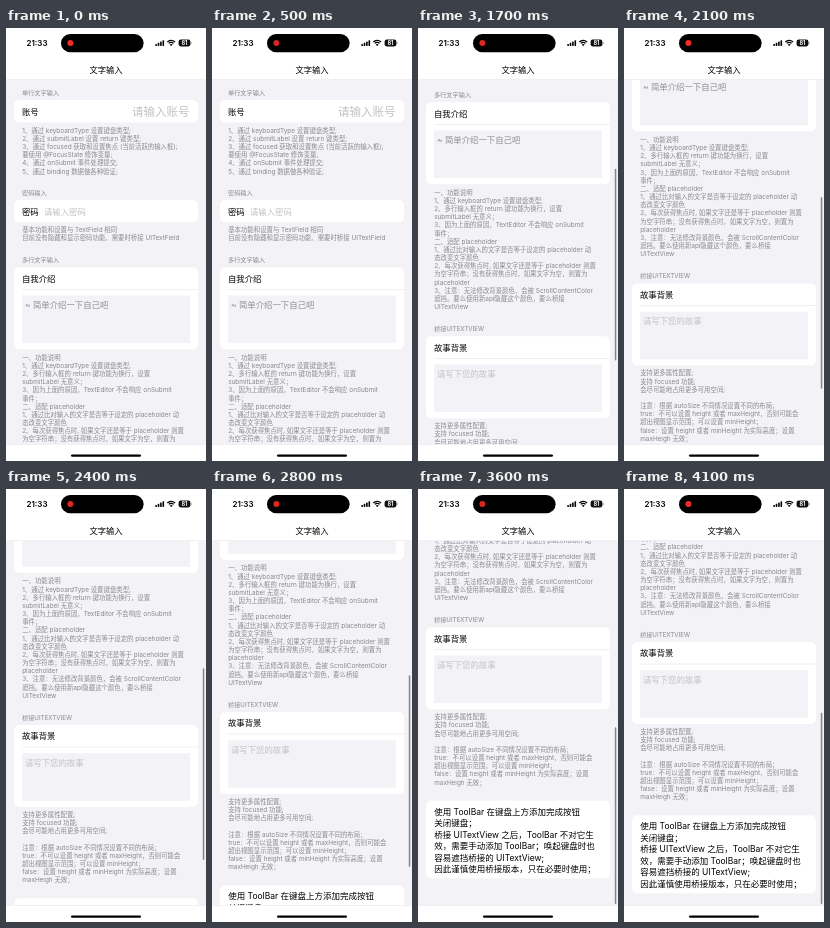
Write an HTML page with a canvas that moves like this. It is 200 px wide and 433 px high and loops after 4200 ms.

```html
<!DOCTYPE html>
<html lang="zh-CN">
<head>
<meta charset="utf-8">
<title>文字输入</title>
<style>
html, body { margin: 0; width: 100%; height: 100%; overflow: hidden; background: #fff; }
canvas { display: block; width: 200px; height: 433px; }
</style>
</head>
<body>
<canvas id="stage"></canvas>
<script>
const W = 200, H = 433, LOOP = 4200, STEP = 100;
const TOP = 52, BOTTOM = 416, MAX = 320;
const FONT = 'Inter, "Noto Sans CJK SC", "Noto Sans CJK", sans-serif';
const GRAY = '#88888d', HINT = '#c2c2c6', PAGE = '#f2f2f7', RULE = '#e2e2e6';

const canvas = document.getElementById('stage');
const ctx = canvas.getContext('2d');
const dpr = window.devicePixelRatio || 1;
canvas.width = W * dpr;
canvas.height = H * dpr;

const notes = {
  account: [
    '1、通过 keyboardType 设置键盘类型;',
    '2、通过 submitLabel 设置 return 键类型;',
    '3、通过 focused 获取和设置焦点 (当前活跃的输入框);',
    '要使用 @FocusState 修饰变量;',
    '4、通过 onSubmit 事件处理提交;',
    '5、通过 binding 数据做各种验证;'
  ],
  password: [
    '基本功能和设置与 TextField 相同',
    '目前没有隐藏和显示密码功能、需要时桥接 UITextField'
  ],
  editor: [
    '一、功能说明',
    '1、通过 keyboardType 设置键盘类型;',
    '2、多行输入框的 return 键功能为换行，设置',
    'submitLabel 无意义；',
    '3、因为上面的原因，TextEditor 不会响应 onSubmit',
    '事件；',
    '二、适配 placeholder',
    '1、通过比对输入的文字是否等于设定的 placeholder 动',
    '态改变文字颜色',
    '2、每次获得焦点时, 如果文字还是等于 placeholder 则置',
    '为空字符串；没有获得焦点时，如果文字为空，则置为',
    'placeholder',
    '3、注意：无法修改背景颜色，会被 ScrollContentColor',
    '遮挡。要么使用新api隐藏这个颜色，要么桥接',
    'UITextView'
  ],
  bridge: [
    '支持更多属性配置;',
    '支持 focused 功能;',
    '会尽可能地占用更多可用空间;',
    '',
    '注意：根据 autoSize 不同情况设置不同的布局；',
    'true：不可以设置 height 或者 maxHeight，否则可能会',
    '超出视图显示范围；可以设置 minHeight；',
    'false：设置 height 或者 minHeight 为实际高度；设置',
    'maxHeigh 无效；'
  ],
  toolbar: [
    '使用 ToolBar 在键盘上方添加完成按钮',
    '关闭键盘；',
    '桥接 UITextView 之后，ToolBar 不对它生',
    '效，需要手动添加 ToolBar；唤起键盘时也',
    '容易遮挡桥接的 UITextView;',
    '因此谨慎使用桥接版本，只在必要时使用；'
  ]
};

// y is the vertical middle of the glyphs
function text(str, x, y, size, color = '#000', weight = 400, align = 'left') {
  ctx.font = `${weight} ${size}px ${FONT}`;
  ctx.fillStyle = color;
  ctx.textAlign = align;
  ctx.fillText(str, x, y + size * 0.37);
}

function box(x, y, w, h, r, color) {
  ctx.fillStyle = color;
  ctx.beginPath();
  ctx.roundRect(x, y, w, h, r);
  ctx.fill();
}

function lines(list, y, size, pitch, color) {
  list.forEach((s, i) => text(s, 16.2, y + i * pitch, size, color));
}

const card = (y, h) => box(8, y, 184, h, 5, '#fff');
const note = (list, y) => lines(list, y, 6.4, 8.17, GRAY);
const heading = (s, y) => text(s, 16, y, 6.2, GRAY);

function editor(y, title, hint, color) {
  card(y, 82);
  text(title, 16, y + 11.3, 8.4, '#000', 500);
  box(16, y + 21.8, 176, 0.5, 0, RULE);
  box(16, y + 28.3, 168, 47.5, 0, PAGE);
  text(hint, 19, y + 37.8, 8.4, color);
}

function drawContent() {
  heading('单行文字输入', 65);
  card(72, 22.5);
  text('账号', 16, 83.5, 8.4, '#000', 500);
  text('请输入账号', 183.5, 83.5, 11.5, HINT, 400, 'right');
  note(notes.account, 102.3);

  heading('密码输入', 164.5);
  card(172, 22.5);
  text('密码', 16, 183.5, 8.4, '#000', 500);
  text('请输入密码', 38, 183.5, 8.4, HINT);
  note(notes.password, 201.8);

  heading('多行文字输入', 232);
  editor(239.3, '自我介绍', '~ 简单介绍一下自己吧', '#8e8e93');
  note(notes.editor, 329.4);

  heading('桥接UITEXTVIEW', 466);
  editor(473.3, '故事背景', '请写下您的故事', HINT);
  note(notes.bridge, 562.9);

  card(646.5, 78);
  lines(notes.toolbar, 657.7, 8.5, 11.5, '#000');
}

const mix = (a, b, k) => a + (b - a) * k;

// cubic from (t0, p0) to (t1, p1) with end speeds in px per ms
function curve(t, t0, p0, v0, t1, p1, v1) {
  const d = t1 - t0, u = (t - t0) / d, u2 = u * u, u3 = u2 * u;
  return (2 * u3 - 3 * u2 + 1) * p0 + (u3 - 2 * u2 + u) * d * v0 +
    (3 * u2 - 2 * u3) * p1 + (u3 - u2) * d * v1;
}

const glide = t => 261 - 96 * Math.exp((1700 - t) / 500);

function scrollAt(t) {
  if (t <= 800) return 0;
  if (t < 1100) return curve(t, 800, 0, 0, 1100, 23, 0.12);
  if (t < 1300) return curve(t, 1100, 23, 0.12, 1300, glide(1300), 0.3);
  if (t < 2800) return glide(t);
  if (t < 3200) return curve(t, 2800, glide(2800), 0.02, 3200, 303, 0.2);
  if (t < 3500) return curve(t, 3200, 303, 0.2, 3500, 337, 0);
  if (t < 3600) return mix(337, 335, (t - 3500) / 100);
  return MAX + 15 * Math.exp((3600 - t) / 135);
}

function drawThumb(t, pos) {
  const view = BOTTOM - TOP, total = view + MAX;
  const over = Math.max(0, pos - MAX);
  const len = view * view / total - over;
  const y = TOP + Math.min(pos, MAX) / total * view + over;
  const alpha = 0.45 * Math.min(1, Math.max(0, (t - 800) / 200));
  box(196.8, y + 1, 1.5, len - 2, 0.75, `rgba(0,0,0,${alpha})`);
}

function drawStatus(t) {
  text('21:33', 31, 15.2, 8, '#000', 600, 'center');
  box(55, 6, 82.6, 18.3, 9.15, '#000');

  const pulse = 0.94 + 0.06 * Math.cos(t / LOOP * Math.PI * 8);
  ctx.fillStyle = `rgba(240,45,38,${pulse})`;
  ctx.beginPath();
  ctx.arc(64.4, 15, 3, 0, Math.PI * 2);
  ctx.fill();

  for (let i = 0; i < 4; i++) {
    const h = 2 + i * 1.2;
    box(149.3 + i * 2.4, 17.9 - h, 1.6, h, 0.4, '#000');
  }

  ctx.strokeStyle = '#000';
  ctx.lineWidth = 1.2;
  for (const r of [5.3, 3.3]) {
    ctx.beginPath();
    ctx.arc(165.2, 17.6, r, -Math.PI * 0.76, -Math.PI * 0.24);
    ctx.stroke();
  }
  ctx.fillStyle = '#000';
  ctx.beginPath();
  ctx.moveTo(165.2, 18);
  ctx.arc(165.2, 18, 2, -Math.PI * 0.76, -Math.PI * 0.24);
  ctx.fill();

  box(172.6, 11.6, 11.8, 6.8, 2.1, '#111');
  box(184.8, 14, 0.7, 2, 0.3, '#777');
  text('81', 178.5, 15, 5.6, '#fff', 700, 'center');
}

function draw(t) {
  const pos = scrollAt(t);
  ctx.setTransform(dpr, 0, 0, dpr, 0, 0);
  ctx.fillStyle = '#fff';
  ctx.fillRect(0, 0, W, H);

  ctx.save();
  ctx.beginPath();
  ctx.rect(0, TOP, W, BOTTOM - TOP);
  ctx.clip();
  ctx.fillStyle = PAGE;
  ctx.fillRect(0, TOP, W, BOTTOM - TOP);
  ctx.translate(0, -pos);
  drawContent();
  ctx.translate(0, pos);
  drawThumb(t, pos);
  ctx.restore();

  box(0, TOP - 0.4, W, 0.5, 0, RULE);
  box(0, BOTTOM - 0.1, W, 0.5, 0, RULE);
  drawStatus(t);
  text('文字输入', 100, 41.5, 8.3, '#000', 500, 'center');
  box(65, 426.4, 70, 2.4, 1.2, '#000');
}

const start = performance.now();
function tick() {
  const t = (performance.now() - start) % LOOP;
  draw(Math.floor(t / STEP) * STEP);
  requestAnimationFrame(tick);
}
tick();
</script>
</body>
</html>
```
